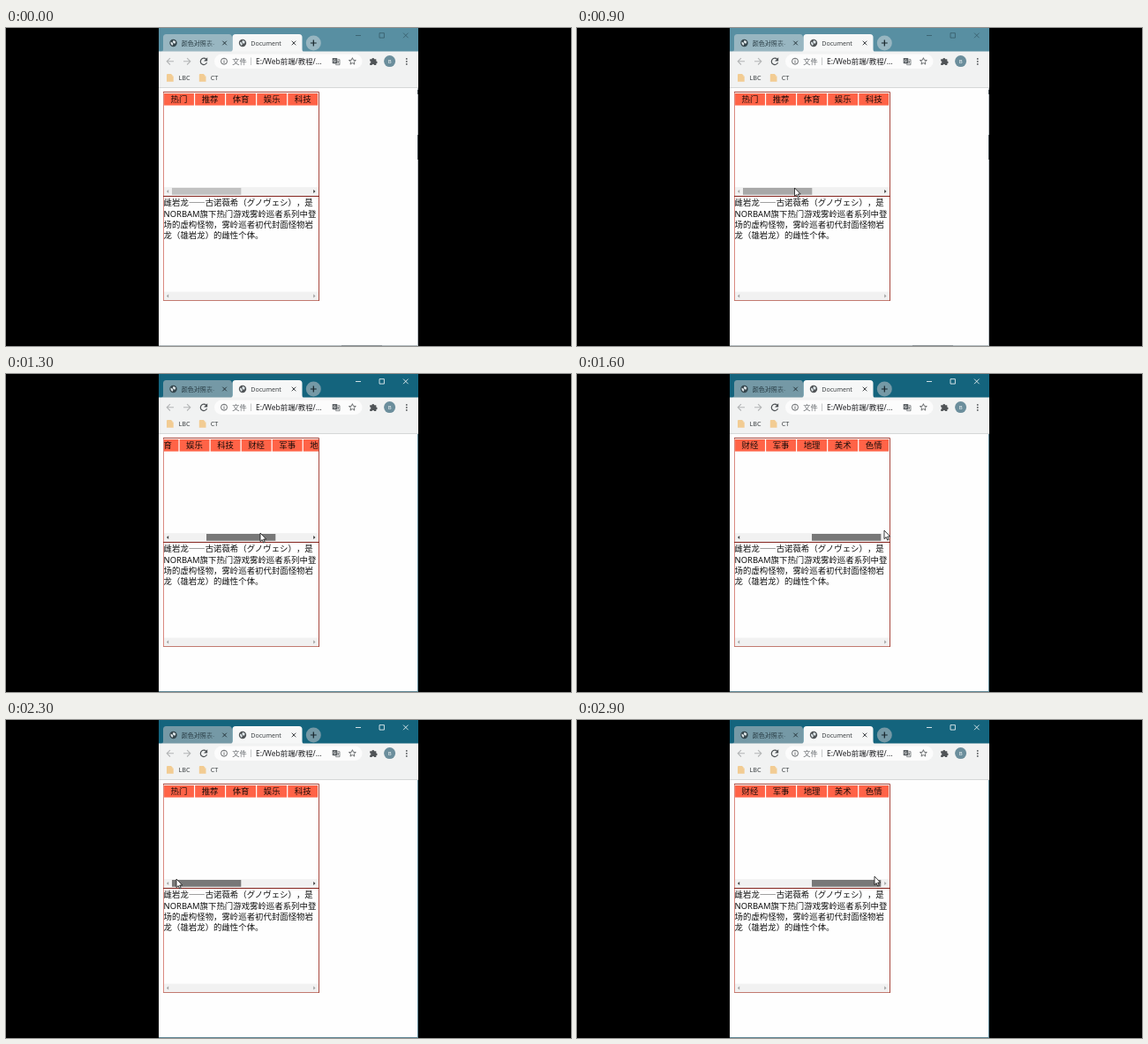
Animation, 640 px wide and 360 px high, one loop 3 s. Source, as an HTML page:

```html
<!DOCTYPE html>
<html lang="zh-CN">
<head>
<meta charset="utf-8">
<title>Scrolling menu</title>
<style>
html, body { margin: 0; width: 100%; height: 100%; overflow: hidden; background: #000; }
svg { display: block; width: 640px; height: 360px; }
text {
  font-family: "Noto Sans CJK SC", "Noto Sans CJK", sans-serif;
  text-spacing-trim: space-all;
  white-space: pre;
}
.lat { font-family: "Noto Sans", "Open Sans", sans-serif; }
.line { fill: none; stroke-linecap: butt; }
</style>
</head>
<body>
<svg viewBox="0 0 640 360" xmlns="http://www.w3.org/2000/svg">
  <defs>
    <clipPath id="page"><rect x="173" y="0" width="294" height="360"/></clipPath>
    <clipPath id="menuClip"><rect x="178.6" y="72.6" width="176" height="108"/></clipPath>
    <linearGradient id="fade" gradientUnits="userSpaceOnUse" x1="224" x2="242" y1="0" y2="0">
      <stop offset="0" stop-color="#24373f"/>
      <stop offset="1" stop-color="#24373f" stop-opacity=".2"/>
    </linearGradient>
  </defs>
  <rect width="640" height="360"/>
  <g clip-path="url(#page)">
    <rect x="173" y="0" width="294" height="360" fill="#fefefe"/>

    <!-- title bar and tabs -->
    <rect id="bar" x="173" y="0" width="294" height="28"/>
    <path id="backTab" d="M175 27q3 0 3-3V10.500q0-3.500 3.500-3.500h71q3.500 0 3.500 3.500v13.500q0 3 3 3z"/>
    <path d="M253 27.500q3.500 0 3.500-3.500V10.500q0-3.500 3.500-3.500h72q3.500 0 3.500 3.500v13.500q0 3.500 3.500 3.500z" fill="#f6f7f7"/>
    <g id="globes"></g>
    <text x="198.700" y="19.600" font-size="7.060" fill="url(#fade)">颜色对照表-</text>
    <text class="lat" x="277.300" y="19.600" font-size="7.060" fill="#3c4043">Document</text>
    <path class="line" d="M245.300 14.700l4.600 4.600m0-4.600l-4.600 4.600" stroke="#26353b"/>
    <path class="line" d="M323.700 14.700l4.600 4.600m0-4.600l-4.600 4.600" stroke="#45494c"/>
    <circle id="plus" cx="348.300" cy="17" r="8.500"/>
    <path class="line" d="M344.900 17h6.800m-3.400-3.400v6.800" stroke="#17242a" stroke-width="1.200"/>
    <path id="controls" class="line" d="M396 8.500h6M423 5.700h5.400v5.400h-5.400zM450 5.600l5.600 5.600m0-5.600l-5.600 5.600" stroke-width=".8"/>

    <!-- toolbar -->
    <rect x="173" y="26.500" width="294" height="41" fill="#f1f2f2"/>
    <rect x="236" y="29.500" width="167.500" height="16.500" rx="8.250" fill="#fcfcfc"/>
    <path class="line" d="M190 37.800h-7.600m3.500-3.700l-3.700 3.700l3.700 3.700" stroke="#b3b5b6" stroke-width="1.100"/>
    <path class="line" d="M201 37.800h7.600m-3.500-3.700l3.700 3.700l-3.700 3.700" stroke="#b3b5b6" stroke-width="1.100"/>
    <path class="line" d="M226.800 35.400a3.700 3.700 0 1 0 .7 3.700" stroke="#4c5053" stroke-width="1.200"/>
    <path d="M228.200 33.200v4.200h-4.200z" fill="#4c5053"/>
    <circle cx="247" cy="37.700" r="3.500" class="line" stroke="#55595c" stroke-width=".9"/>
    <path class="line" d="M247 35.600v.9m0 .7v2.500" stroke="#55595c" stroke-width=".9"/>
    <text x="256.300" y="40.700" font-size="8.230" fill="#676b6f">文件</text>
    <path class="line" d="M277.500 33.500v8.500" stroke="#b8babc" stroke-width=".8"/>
    <text y="40.700" font-size="8.450" fill="#202124"><tspan x="283" class="lat">E:/Web</tspan><tspan>前端</tspan><tspan class="lat">/</tspan><tspan>教程</tspan><tspan class="lat">/...</tspan></text>
    <rect x="369.700" y="34" width="5.500" height="6.200" rx=".6" fill="#5b6064"/>
    <path class="line" d="M373.300 36.300a1.300 1.300 0 1 0 .2 1.300h-1.200" stroke="#fff" stroke-width=".6"/>
    <path class="line" d="M375.300 35.700h2.700v6h-4.300l-.6-1.500M374.800 37.600h2.600m-.6 0q-.4 1.800-1.800 2.900m.5-1.800l1.900 2" stroke="#5b6064" stroke-width=".7"/>
    <path id="star" class="line" stroke="#55595c" stroke-width=".85"/>
    <path d="M412.200 35.300h2.200a1.350 1.350 0 0 1 2.700 0h2.200v2.300a1.300 1.300 0 0 1 0 2.600v1.900h-2.300a1.200 1.200 0 0 0-2.400 0h-2.400v-2.300a1.200 1.200 0 0 0 0-2.400z" fill="#505457"/>
    <circle cx="434.600" cy="37.600" r="6.500" fill="#6b8e9c"/>
    <text class="lat" x="434.600" y="39.800" font-size="6" text-anchor="middle" fill="#eef4f6">B</text>
    <g fill="#505457"><circle cx="453.800" cy="34.900" r=".9"/><circle cx="453.800" cy="37.900" r=".9"/><circle cx="453.800" cy="40.900" r=".9"/></g>

    <!-- bookmarks -->
    <g fill="#f2cc93">
      <path d="M182 53q0-1 1-1h4.500v1h1v7.700h-6.500z M188 54.500h1.700v6.200h-1.700z"/>
      <path d="M218.800 53q0-1 1-1h4.500v1h1v7.700h-6.500z M224.800 54.500h1.700v6.200h-1.700z"/>
    </g>
    <text class="lat" x="195.500" y="59.300" font-size="7.200" fill="#3c4043">LBC</text>
    <text class="lat" x="231.700" y="59.300" font-size="7.200" fill="#3c4043">CT</text>
    <path class="line" d="M173 67.500h294" stroke="#d6d8d8"/>

    <!-- menu box -->
    <g clip-path="url(#menuClip)"><g id="menu"></g></g>
    <g id="bars"></g>
    <rect id="thumb" y="181" width="78.300" height="7.800"/>

    <!-- article box -->
    <g id="story" font-size="9.420" fill="#111"></g>
    <path class="line" d="M178.500 72v237" stroke="#d98a80"/>
    <path class="line" d="M178 308.500h177" stroke="#c27a70"/>
    <path class="line" d="M178 72.500h176.500v236.500" stroke="#a8483e"/>
    <path class="line" d="M178 190.500h177" stroke="#85251f" stroke-width="1.100"/>

    <!-- window edges -->
    <path id="edge" class="line" d="M466.500 68v292M173 359.500h294"/>
    <path id="behind" class="line" d="M466.500 70v5M466.500 121v28" stroke="#3f4a50"/>
    <path id="under" class="line" d="M380 359.500h46" stroke="#8d9599"/>
    <path id="cursor" d="M0 0v9.600l2.200-2 1.500 3.500 1.500-.7-1.500-3.400h3z" fill="#fff" stroke="#111" stroke-width=".8" stroke-linejoin="round"/>
  </g>
</svg>
<script>
const NS = "http://www.w3.org/2000/svg";
const $ = id => document.getElementById(id);
const set = (el, attrs) => {
  for (const k in attrs) el.setAttribute(k, attrs[k]);
  return el;
};
const add = (parent, tag, attrs, text) => {
  const el = set(document.createElementNS(NS, tag), attrs);
  if (text) el.textContent = text;
  return parent.appendChild(el);
};

const LOOP = 3000, STEP = 100;
const PITCH = 35.05, TRAVEL = 78, GRAB_X = 249, THUMB_X = 188;
const labels = "热门 推荐 体育 娱乐 科技 财经 军事 地理 美术 色情".split(" ");

labels.forEach((label, i) => {
  const x = 179.1 + i * PITCH;
  add($("menu"), "rect", { x, y: 74, width: PITCH - 1.2, height: 13.6, fill: "#ff6347" });
  add($("menu"), "text", { x: x + 16.9, y: 84.4, "font-size": 9.42, "text-anchor": "middle", fill: "#1c0d0a" }, label);
});

const story = [
  "雌岩龙——古诺薇希（グノヴェシ），是",
  "旗下热门游戏雾岭巡者系列中登",
  "场的虚构怪物，雾岭巡者初代封面怪物岩",
  "龙（雄岩龙）的雌性个体。"
];
story.forEach((line, i) => {
  const row = add($("story"), "text", { x: 178.6, y: 201.1 + i * 12.4 });
  if (i === 1) add(row, "tspan", { class: "lat" }, "NORBAM");
  add(row, "tspan", {}, line);
});

// Scroll tracks with their end arrows
const arrow = (x, y, dir) =>
  add($("bars"), "path", { d: `M${x - dir} ${y - 2.1}l${2.3 * dir} 2.1l${-2.3 * dir} 2.100z`, fill: "#a3a3a3" });
const arrows = [180.2, 298.6].map(y => {
  add($("bars"), "rect", { x: 178.8, y, width: 175.5, height: 9.7, fill: "#f1f1f1" });
  return [arrow(183.2, y + 4.8, -1), arrow(349.2, y + 4.8, 1)];
})[0];

for (const [x, ink] of [[189.5, "#34454c"], [268, "#505457"]]) {
  add($("globes"), "circle", { cx: x, cy: 17, r: 4.2, fill: ink });
  add($("globes"), "path", {
    d: `M${x - 3} 15.600l2.300 1.200l.5 1.700l-1 1.600q-2.300-1.500-1.800-4.500zM${x + .3} 13.800l2.500 1.600l-.8 2.300l-1.900-.5l-.8-1.700z`,
    fill: "#dce4e7"
  });
}

const points = Array.from({ length: 10 }, (_, i) => {
  const r = i % 2 ? 1.8 : 4.1, a = i * Math.PI / 5;
  return `${392.4 + r * Math.sin(a)} ${37.8 - r * Math.cos(a)}`;
});
$("star").setAttribute("d", "M" + points.join("L") + "Z");

// Pointer path: time, x, y
const path = [
  [200, 452, 68], [400, 363, 103], [600, 305, 138], [800, 256, 177],
  [900, 246.500, 181], [1000, 248, 181], [1100, 255, 181], [1300, 288, 180],
  [1500, 333, 178], [1600, 348, 177], [1700, 351, 177], [1800, 344, 178],
  [2000, 285, 180], [2200, 212, 180], [2300, 193, 180], [2400, 193, 180],
  [2500, 203, 180], [2700, 275, 179], [2900, 337, 177]
];

function pointer(t) {
  const n = path.findIndex(p => p[0] >= t);
  const b = path[n], a = path[Math.max(0, n - 1)];
  const k = b === a ? 0 : (t - a[0]) / (b[0] - a[0]);
  return [a[1] + (b[1] - a[1]) * k, a[2] + (b[2] - a[2]) * k];
}

function draw(t) {
  const shown = t >= 200, drag = t >= 1000;
  const [x, y] = pointer(t);
  const pos = drag ? Math.min(TRAVEL, Math.max(0, x - GRAB_X)) : 0;
  const hover = shown && y >= 180;

  set($("cursor"), { transform: `translate(${x} ${y})`, visibility: shown ? "visible" : "hidden" });
  set($("thumb"), { x: THUMB_X + pos, fill: drag ? "#787878" : hover ? "#a8a8a8" : "#c1c1c1" });
  set($("menu"), { transform: `translate(${-pos / TRAVEL * PITCH * 5} 0)` });
  set(arrows[0], { fill: pos > 0 ? "#404040" : "#a3a3a3" });
  set(arrows[1], { fill: pos < TRAVEL ? "#404040" : "#a3a3a3" });

  set($("bar"), { fill: drag ? "#14647d" : "#588fa2" });
  set($("backTab"), { fill: drag ? "#7599a6" : "#98b6c1" });
  set($("plus"), { fill: drag ? "#7599a6" : "#98b6c1" });
  set($("controls"), { stroke: drag ? "#fff" : "#365c69" });
  set($("edge"), { stroke: drag ? "#5f8795" : "#b4bcc0" });
  for (const id of ["behind", "under"]) set($(id), { visibility: drag ? "hidden" : "visible" });
}

function tick() {
  draw(Math.floor(performance.now() % LOOP / STEP) * STEP);
  requestAnimationFrame(tick);
}
tick();
</script>
</body>
</html>
```
